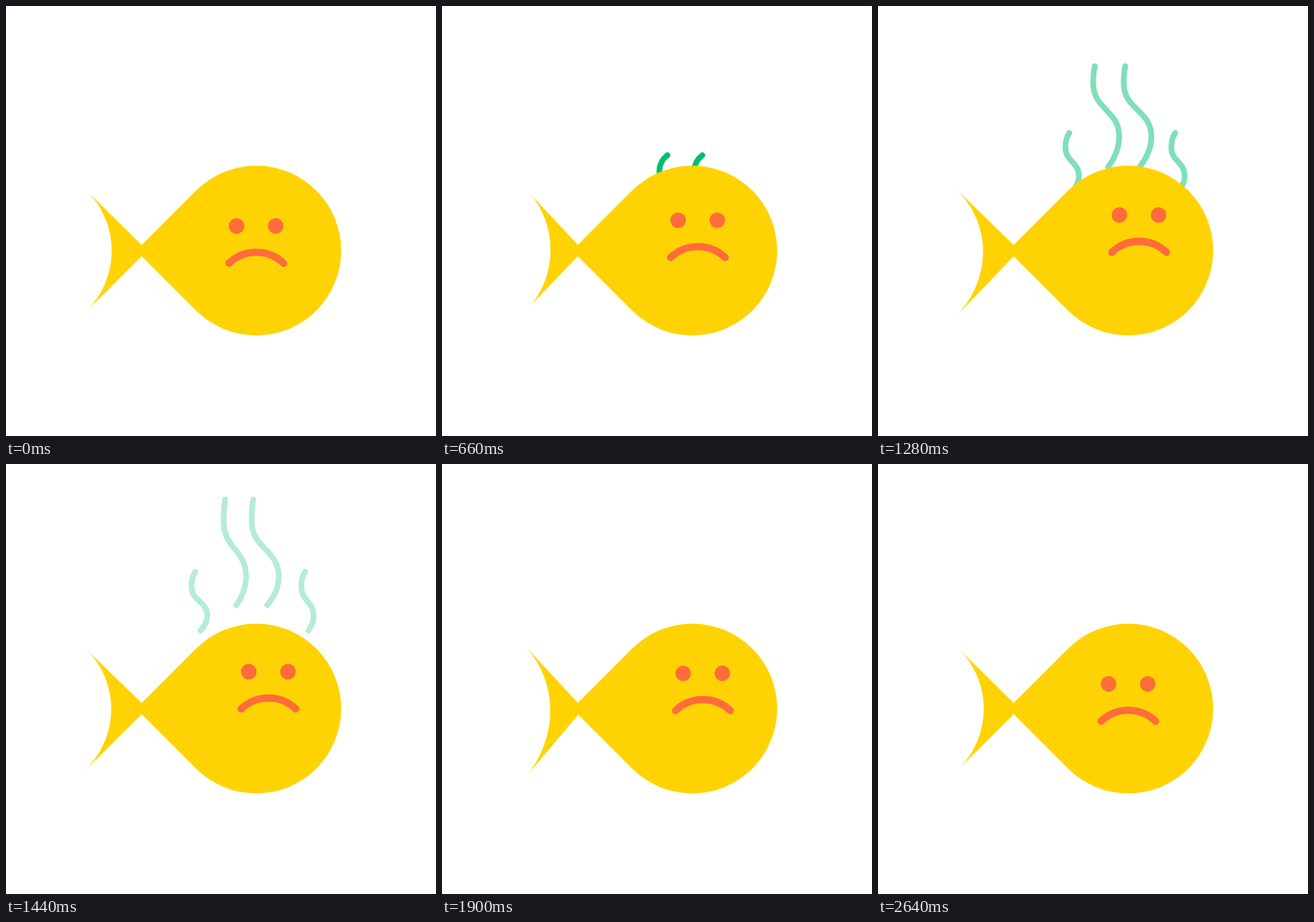
These frames come from a looping animation (567x567 px, 2.78 s). An HTML page with a canvas:

```html
<!DOCTYPE html>
<html lang="en">
<head>
<meta charset="utf-8">
<title>Sad fish</title>
<style>
  html, body { margin: 0; width: 100%; height: 100%; overflow: hidden; background: #fff; }
  canvas { display: block; }
</style>
</head>
<body>
<canvas id="stage" width="567" height="567"></canvas>
<script>
const ctx = document.getElementById('stage').getContext('2d');
const SIZE = 567, LOOP = 2780, MOVE = 2640;
const YELLOW = '#ffd303', ORANGE = '#ff6c3b', GREEN = '#00be70';
const BODY = { x: 330, y: 322.5, r: 112 };
const TAIL = { hinge: 186.4, depth: 500, beat: MOVE / 5 };
const STEAM = { start: 540, open: 980, full: 1600, end: 1670 };

// Tip position and sideways drift of each wisp; swing is the width of its S
const BIG = { y: 140, climb: 125, height: 122, growth: 23, curl: 19, lean: 2 };
const SMALL = { y: 215, climb: 98, height: 73, growth: 6, curl: 0, lean: 5 };
const WISPS = [
  { ...BIG, x: 280, drift: 12, swing: 43, widen: -18 },
  { ...BIG, x: 326, drift: 0, swing: 38, widen: -3 },
  { ...SMALL, x: 257, drift: -10, swing: 12, widen: 12 },
  { ...SMALL, x: 387, drift: 10, swing: 20, widen: -5 }
];

const lerp = (a, b, k) => a + (b - a) * k;
const clamp = k => Math.max(0, Math.min(1, k));

function drawWisp(w, k, hidden) {
  const x = w.x + w.drift * k + w.curl * hidden;
  const y = w.y - w.climb * k + w.climb * hidden / 2;
  const h = w.height + w.growth * k;
  const big = w.curl > 0;
  const left = w.x + w.drift * k - w.lean + w.curl * hidden / 2;
  const right = left + w.swing + w.widen * k;
  const leftY = y + h * (big ? lerp(0.1, 0.24, k) : 0.25) + w.curl * hidden / 2;
  const rightY = y + h * (big ? lerp(0.56, 0.76, Math.sqrt(k)) : 0.75);
  const mid = (leftY + rightY) / 2;
  ctx.beginPath();
  ctx.moveTo(x, y);
  ctx.quadraticCurveTo(left, lerp(y, leftY, 0.4), left, leftY);
  ctx.bezierCurveTo(left, mid, right, mid, right, rightY);
  ctx.quadraticCurveTo(right, lerp(rightY, y + h, 0.5), lerp(left, right, 0.57), y + h);
  ctx.stroke();
}

function drawSteam(t) {
  const { start, open, full, end } = STEAM;
  if (t < start || t > end) return;
  const k = Math.max(0, (t - open) / (full - open));
  const hidden = Math.cos(Math.PI / 2 * clamp((t - start) / (open - start)));
  ctx.globalAlpha = clamp((end - t) / 780);
  ctx.strokeStyle = GREEN;
  ctx.lineWidth = 7.5;
  for (const w of WISPS) drawWisp(w, k, hidden);
  ctx.globalAlpha = 1;
}

// One strong and one weak flick of the tail per beat
function wagAngle(t) {
  const phase = 2 * Math.PI * (t - 290) / TAIL.beat;
  return (9 + 20 * Math.cos(phase) + 16 * Math.cos(2 * phase)) * Math.PI / 180;
}

// Turn a tail point about the vertical hinge and project it from the stage centre
function project(x, y, angle) {
  const reach = TAIL.hinge - x, c = SIZE / 2;
  const scale = 1 / (1 - reach * Math.sin(angle) / TAIL.depth);
  return [c + (TAIL.hinge - reach * Math.cos(angle) - c) * scale, c + (y - c) * scale];
}

function drawTail(t) {
  const angle = wagAngle(t), steps = 48;
  const cx = TAIL.hinge - BODY.r * Math.SQRT2;
  ctx.beginPath();
  ctx.moveTo(TAIL.hinge, BODY.y);
  for (let i = 0; i <= steps; i++) {
    const a = lerp(-Math.PI / 4, Math.PI / 4, i / steps);
    ctx.lineTo(...project(cx + BODY.r * Math.cos(a), BODY.y + BODY.r * Math.sin(a), angle));
  }
  ctx.fill();
}

function drawBody() {
  const { x, y, r } = BODY;
  ctx.beginPath();
  ctx.moveTo(x - r * Math.SQRT2, y);
  ctx.arc(x, y, r, -Math.PI * 0.75, Math.PI * 0.75);
  ctx.fill();
}

function drawFace(t) {
  const peak = 1660;
  const d = 18.6 * (t < peak ? t / peak : (MOVE - t) / (MOVE - peak));
  ctx.save();
  ctx.translate(d, -d);
  ctx.fillStyle = ctx.strokeStyle = ORANGE;
  for (const x of [304, 355.6]) {
    ctx.beginPath();
    ctx.arc(x, 290, 10.3, 0, Math.PI * 2);
    ctx.fill();
  }
  ctx.lineWidth = 9.6;
  ctx.beginPath();
  ctx.arc(330, 376.7, 52, -Math.PI / 2 - 0.765, -Math.PI / 2 + 0.765);
  ctx.stroke();
  ctx.restore();
}

function draw(t) {
  ctx.fillStyle = '#fff';
  ctx.fillRect(0, 0, SIZE, SIZE);
  drawSteam(t);
  ctx.fillStyle = YELLOW;
  drawTail(t);
  drawBody();
  drawFace(t);
}

ctx.lineCap = 'round';
const start = performance.now();
function tick() {
  draw(Math.min((performance.now() - start) % LOOP, MOVE));
  requestAnimationFrame(tick);
}
tick();
</script>
</body>
</html>
```
